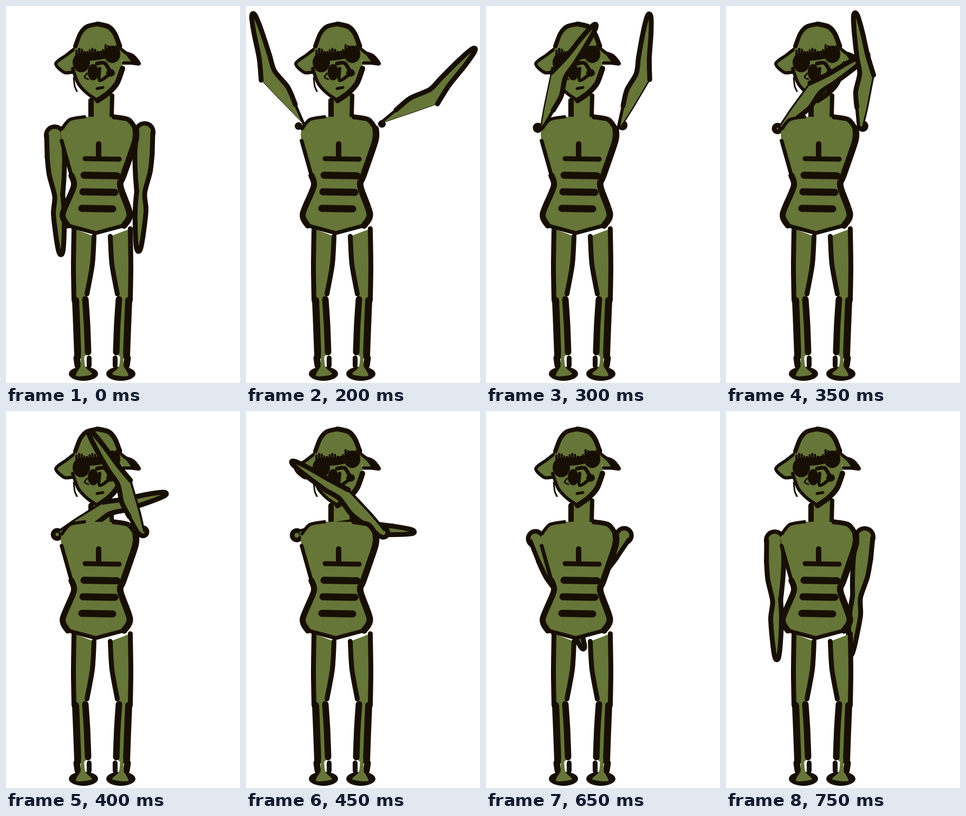
Recreate the animation shown at these times as an HTML page with a canvas. Size 432 by 694 pixels, loop 800 ms.

```html
<!DOCTYPE html>
<html lang="en">
<head>
<meta charset="utf-8">
<title>Arm swing</title>
<style>
html, body { margin: 0; width: 100%; height: 100%; overflow: hidden; background: #fff; }
canvas { display: block; width: 432px; height: 694px; }
</style>
</head>
<body>
<canvas id="stage" width="432" height="694"></canvas>
<script>
const ctx = document.getElementById('stage').getContext('2d');
const GREEN = '#667538', INK = '#170f03';
const LOOP = 800, STEP = 50, START = 200, END = 750;

// Upper-arm angles in degrees at the key times; the arms swing in opposite directions
const TIMES = [200, 250, 350, 450, 550, 750, 800];
const ARMS = [
  { side: 1, angles: [-125, -94, -48, -7, 41, 89, 87], raised: [107, 218], lowered: [90, 238], cap: [97, 221] },
  { side: -1, angles: [-28, -48, -85, -136, -202, -263, -267], raised: [246, 217], lowered: [256, 232], cap: [251, 217] }
];

const mix = (a, b, p) => a + (b - a) * p;
const mixPt = (a, b, p) => [mix(a[0], b[0], p), mix(a[1], b[1], p)];
const clamp = v => Math.max(0, Math.min(1, v));
const polar = ([x, y], deg, len) => {
  const a = deg * Math.PI / 180;
  return [x + len * Math.cos(a), y + len * Math.sin(a)];
};
// Places a half outline on one side of an upright axis
const mirror = (axis, side, pts) => pts.map(([dx, y]) => [axis(y) + side * dx, y]);

// Smooth curve through the points
function trace(pts) {
  const at = i => pts[Math.max(0, Math.min(pts.length - 1, i))];
  ctx.beginPath();
  ctx.moveTo(...pts[0]);
  for (let i = 0; i < pts.length - 1; i++) {
    const [a, b, c, d] = [at(i - 1), at(i), at(i + 1), at(i + 2)];
    ctx.bezierCurveTo(
      b[0] + (c[0] - a[0]) / 7, b[1] + (c[1] - a[1]) / 7,
      c[0] - (d[0] - b[0]) / 7, c[1] - (d[1] - b[1]) / 7, c[0], c[1]);
  }
}

function line(pts, width) {
  trace(pts);
  ctx.lineWidth = width;
  ctx.strokeStyle = INK;
  ctx.stroke();
}

function fill(pts, color = GREEN) {
  trace(pts);
  ctx.fillStyle = color;
  ctx.fill();
}

function blob(x, y, rx, ry, color = INK) {
  ctx.beginPath();
  ctx.ellipse(x, y, rx, ry, 0, 0, 7);
  ctx.fillStyle = color;
  ctx.fill();
}

function drawHead() {
  const axis = () => 169;
  const half = [[0, 33], [20, 38], [32, 51], [41, 74], [46, 115], [36, 142], [20, 160], [0, 174]];
  const [l, r] = [-1, 1].map(side => mirror(axis, side, half));

  ctx.fillStyle = GREEN;
  ctx.fillRect(157, 160, 39, 50);
  line([[157, 174], [157, 204]], 10);
  line([[196, 165], [195, 204]], 8);

  for (const [side, drop] of [[-1, 122], [1, 105]]) {
    const ear = mirror(axis, side, [[39, 76], [57, 90], [77, 106], [62, drop], [47, drop]]);
    fill(ear);
    line(ear, 6);
  }
  fill([[216, 82], [236, 89], [249, 106], [232, 104]], INK);
  fill([...l, ...r.reverse()]);
  line(l.slice(0, 4), 8);
  line(l.slice(4), 6);
  line(r.slice(4), 9);
  line(r.slice(0, 4), 10);
  line([[125, 132], [127, 148], [131, 157]], 3);
  drawFace();
}

function drawFace() {
  // Glasses with a bristly upper edge
  blob(139, 104, 16, 18);
  blob(196, 89, 15, 16);
  line([[136, 94], [168, 92], [200, 85]], 15);
  for (let i = 0; i < 17; i++) {
    const x = 130 + i * 4.9;
    const top = (x < 182 ? 82 : 75) + 3 * Math.sin(i * 5);
    line([[x, top + 12], [x, top]], 4);
  }
  // Nose and mouth
  blob(161, 122, 10, 15);
  blob(193, 123, 8, 7);
  line([[168, 106], [182, 105], [192, 120]], 7);
  line([[192, 125], [173, 137], [173, 115]], 6);
  line([[150, 124], [145, 131], [152, 135]], 3);
  line([[168, 152], [179, 150]], 5);
}

function drawLegs() {
  for (const side of [-1, 1]) {
    const half = pts => mirror(() => 177.5, side, pts);
    const outer = half([[52, 410], [53, 480], [52, 542]]);
    const inner = half([[15, 424], [18, 475], [28, 530]]);
    const shin = half([[49, 542], [47, 590], [45, 645]]);
    const calf = half([[31, 540], [28, 585], [26, 637]]);
    fill([...outer, ...shin, ...calf.slice().reverse(), ...inner.slice().reverse()]);
    line(outer, 9);
    line(inner, 9);
    line(shin, 13);
    line(calf, 12);
    // Foot
    const [[x, y]] = half([[34.5, 677]]);
    blob(x, y, 27, 13);
    line(half([[47, 648], [45, 662]]), 12);
    line(half([[24, 648], [24, 662]]), 9);
    fill(half([[39, 640], [34, 640], [31, 664], [19, 678], [48, 681], [40, 664]]));
  }
}

function drawTorso() {
  const axis = y => 172 - (y - 204) * .03;
  const half = [[27, 204], [54, 209], [68, 226], [68, 248], [48, 312], [43, 332], [62, 383], [52, 404], [0, 418]];
  const [l, r] = [-1, 1].map(side => mirror(axis, side, half));
  fill([...l, ...r.slice().reverse()]);
  line(l.slice(0, 3), 6);
  line(l.slice(3, 5), 7);
  line(l.slice(4, 8), 11);
  line(l.slice(7), 7);
  line(r.slice(0, 3), 9);
  line(r.slice(2, 8), 12);
  line(r.slice(7), 7);

  line([[171, 254], [171, 280]], 10);
  for (let i = 0; i < 4; i++) {
    const y = 281 + i * 30.5;
    line([[146 - 2 * i, y], [209 - 4 * i, y + 1]], i ? 13 : 9);
  }
}

function poseAt(arm, t) {
  const i = Math.max(0, TIMES.findIndex(time => time >= t) - 1);
  const p = (t - TIMES[i]) / (TIMES[i + 1] - TIMES[i]);
  const angle = mix(arm.angles[i], arm.angles[i + 1], p);
  const low = clamp((t - START) / (END - START));
  // The upper arm looks shorter while it passes the head
  const reach = 112 - 16 * Math.sin(Math.PI * clamp(low * 1.6));
  const shoulder = mixPt(arm.raised, arm.lowered, low);
  const elbow = polar(shoulder, angle, reach);
  const hand = polar(elbow, angle + arm.side * mix(20, 0, low), 113 - 8 * low);
  return { low, shoulder, elbow, hand };
}

// Returns a function for points at a share of the bone, pushed sideways
function bone(a, b, side) {
  const len = Math.hypot(b[0] - a[0], b[1] - a[1]);
  const nx = side * (b[1] - a[1]) / len, ny = -side * (b[0] - a[0]) / len;
  return (share, off) => {
    const [x, y] = mixPt(a, b, share);
    return [x + nx * off, y + ny * off];
  };
}

function drawArm(arm, t) {
  const { low, shoulder, elbow, hand } = poseAt(arm, t);
  const upper = bone(shoulder, elbow, arm.side), fore = bone(elbow, hand, arm.side);
  const w = (up, down) => mix(up, down, low);

  const cap = mixPt(arm.cap, arm.lowered, low);
  blob(...cap, w(7, 20), w(7, 20));
  if (low > .2) blob(...cap, w(-2, 12), w(-2, 12), GREEN);

  // A raised arm narrows to a point at the shoulder and has a thin trailing edge
  const lead = [
    upper(0, -w(0, 15)), upper(.35, -w(8, 16)), upper(.65, -w(15, 14)),
    upper(1, -w(12, 6)), fore(.3, -10), fore(.7, -7.5), fore(.97, -4)
  ];
  const tail = [fore(1.03, 0), fore(.97, 4), fore(.7, 7.5), fore(.3, 10), upper(w(1, .98), w(18, 9))];
  const cut = [tail[4], upper(w(.65, .7), w(12, 13)), upper(.35, w(6.5, 16)), upper(0, w(0, 15))];
  fill([...lead, ...tail, ...cut]);
  line(cut, w(1, 9));
  line(lead.slice(0, 2), w(5, 9));
  line([...lead.slice(1), ...tail], 9);
}

function draw(t) {
  ctx.fillStyle = '#fff';
  ctx.fillRect(0, 0, 432, 694);
  ctx.lineCap = ctx.lineJoin = 'round';
  const time = t < START ? LOOP : Math.floor(t / STEP) * STEP;
  drawHead();
  ARMS.forEach(arm => drawArm(arm, time));
  drawLegs();
  drawTorso();
}

const begin = performance.now();
function tick() {
  draw((performance.now() - begin) % LOOP);
  requestAnimationFrame(tick);
}
tick();
</script>
</body>
</html>
```
